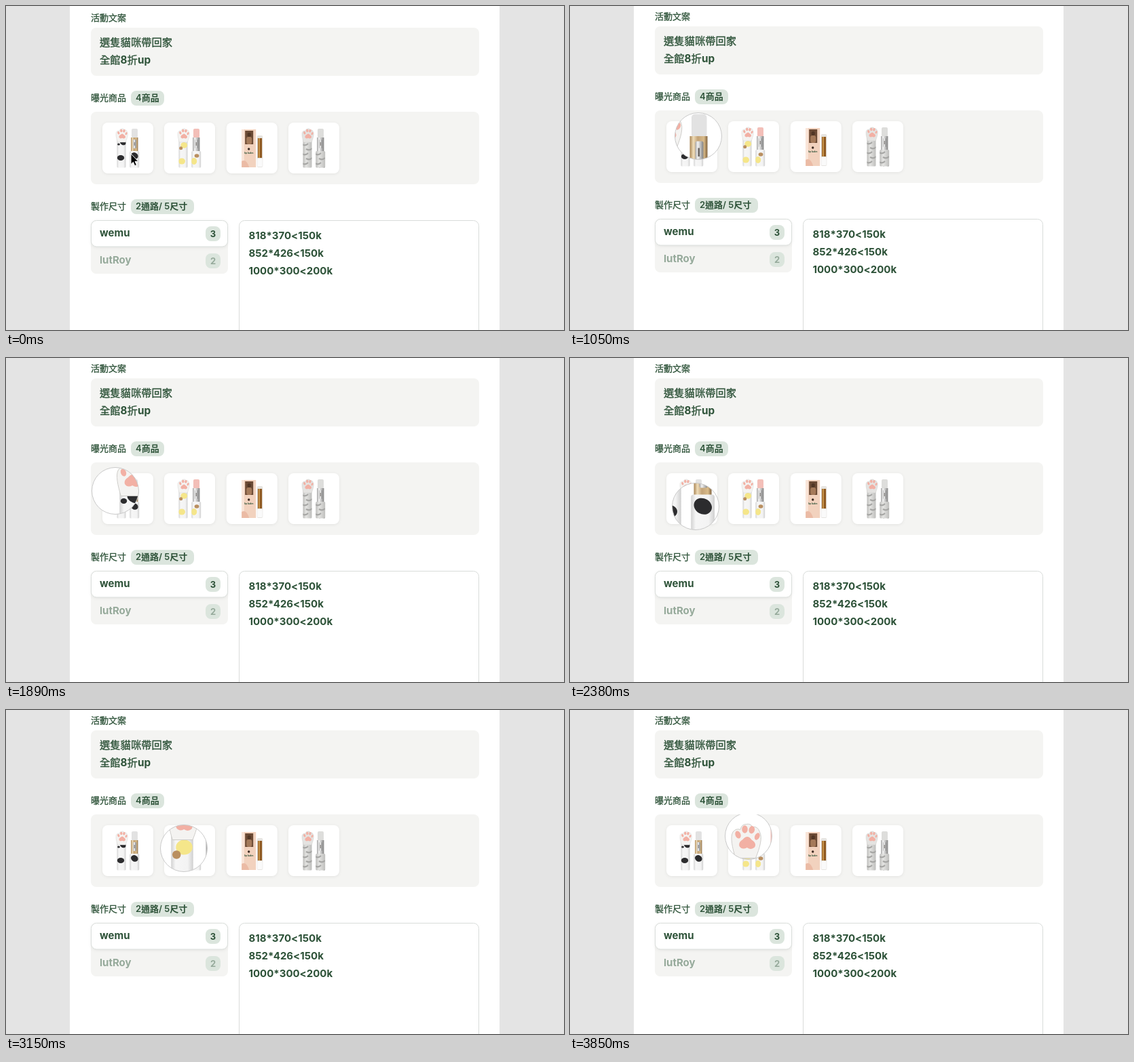
Animation, 822 px wide and 478 px high, one loop 4.13 s. Source, as an HTML page:

```html
<!DOCTYPE html>
<html lang="zh-Hant">
<meta charset="utf-8">
<style>
  html, body { margin: 0; width: 100%; height: 100%; overflow: hidden; background: #e4e4e4; }
  svg { display: block; width: 822px; height: 478px; }
  text { font: 700 15px Inter, "Noto Sans CJK TC", sans-serif; font-feature-settings: "calt" 0; fill: #2d5238; }
  .title { font-size: 13px; font-weight: 500; stroke: #2d5238; stroke-width: .3px; }
  .tag { font-size: 13px; font-weight: 600; }
  .copy { font-size: 15.3px; font-weight: 500; stroke: #2d5238; stroke-width: .35px; }
  .copy tspan { font-weight: 700; stroke: none; }
  .mid { text-anchor: middle; font-size: 13px; }
  .panel { fill: #f4f4f2; }
  .badge { fill: #dbe5dd; }
  .card { fill: #fff; filter: drop-shadow(0 1px 2px #0001); }
  .off { fill: #96aa9b; }
</style>
<svg viewBox="0 0 822 478">
  <defs>
    <linearGradient id="shell"><stop stop-color="#d2d2d2"/><stop offset=".2" stop-color="#f6f6f6"/><stop offset=".75" stop-color="#f3f3f3"/><stop offset="1" stop-color="#d0d0d0"/></linearGradient>
    <linearGradient id="grey"><stop stop-color="#bdbdbb"/><stop offset=".35" stop-color="#e4e4e2"/><stop offset="1" stop-color="#bebebc"/></linearGradient>
    <linearGradient id="gold"><stop stop-color="#a98555"/><stop offset=".2" stop-color="#efdcb8"/><stop offset=".45" stop-color="#c3a377"/><stop offset=".8" stop-color="#d9bb8a"/><stop offset="1" stop-color="#80623d"/></linearGradient>
    <linearGradient id="silver"><stop stop-color="#a2a2a2"/><stop offset=".3" stop-color="#f4f4f4"/><stop offset=".7" stop-color="#b5b5b5"/><stop offset="1" stop-color="#808080"/></linearGradient>
    <clipPath id="skin"><rect x="21.5" y="190" width="13" height="46.5" rx="1.5"/><rect x="40.3" y="212" width="13.9" height="24.5" rx="1.5"/></clipPath>
    <clipPath id="shelf"><rect x="125" y="154" width="572" height="107" rx="8"/></clipPath>
    <clipPath id="glass"><circle r="34.5"/></clipPath>
  </defs>
  <path fill="#fff" d="M94 0h633v478H94z"/>
  <g id="page">
    <text class="title" x="125" y="20">活動文案</text>
    <rect class="panel" x="125" y="30" width="572" height="71" rx="8"/>
    <text class="copy" x="138" y="57">選隻貓咪帶回家</text>
    <text class="copy" x="138" y="83">全館<tspan>8</tspan>折<tspan>up</tspan></text>

    <text class="title" x="125" y="138">曝光商品</text>
    <rect class="badge" x="184" y="123" width="49" height="22" rx="8"/>
    <text class="tag" x="191" y="138">4商品</text>
    <rect class="panel" x="125" y="154" width="572" height="107" rx="8"/>
    <g id="cards"></g>

    <text class="title" x="125" y="298">製作尺寸</text>
    <rect class="badge" x="184" y="283" width="93" height="22" rx="8"/>
    <text class="tag" x="191" y="298">2通路/ 5尺寸</text>
    <rect class="panel" x="125" y="314" width="202" height="79" rx="8"/>
    <rect class="card" x="125.5" y="314.5" width="201" height="38.5" rx="8" stroke="#dadedb"/>
    <text x="138" y="338">wemu</text>
    <rect class="badge" x="294" y="323" width="22" height="22" rx="8"/>
    <text class="mid" x="305" y="338.5">3</text>
    <text class="off" x="138" y="378">lutRoy</text>
    <rect class="badge" x="294" y="363" width="22" height="22" rx="8"/>
    <text class="mid off" x="305" y="378.5">2</text>
    <rect x="343.5" y="314.5" width="353" height="200" rx="8" fill="#fff" stroke="#d9dcda"/>
    <text x="357.5" y="342">818*370&lt;150k</text>
    <text x="357.5" y="368">852*426&lt;150k</text>
    <text x="357.5" y="394">1000*300&lt;200k</text>
  </g>
  <g clip-path="url(#shelf)">
    <g id="lens">
      <circle r="34.5" fill="#fff"/>
      <g clip-path="url(#glass)"><use id="zoom"/></g>
      <circle r="34.5" fill="none" stroke="#c9c9c9"/>
    </g>
  </g>
  <path id="cursor" d="M184 218v15.5l3.4-3.2 2.3 5.4 2.7-1.2-2.3-5.2h4.7z" stroke="#fff"/>
</svg>
<script>
const $ = id => document.getElementById(id);
const oval = (fill, x, y, rx, ry = rx, turn = 0) =>
  `<ellipse cx="${x}" cy="${y}" rx="${rx}" ry="${ry}" fill="${fill}" transform="rotate(${turn} ${x} ${y})"/>`;
const box = (fill, x, y, w, h, r = 0) =>
  `<rect x="${x}" y="${y}" width="${w}" height="${h}" rx="${r}" fill="${fill}"/>`;

const pink = '#f2b0a4';
const paw = fur => `<path fill="${fur}" stroke="#c9c7c4" stroke-width=".35"
    d="M22.3 199C20.5 193 19 186.5 20.8 183.6Q22.6 181.2 25.2 182.2Q25.8 179 28.6 179Q31.2 178.4 32.3 180.6Q35.4 180 36.6 183.6C38.4 187 36.6 193 34.2 199Z"/>` +
  oval(pink, 23.8, 185.2, 1.6, 2.3, -20) + oval(pink, 27.8, 182, 1.7, 2.3) +
  oval(pink, 31.9, 182.3, 1.7, 2.3, 12) + oval(pink, 35.1, 186.2, 1.4, 2.2, 25) +
  `<path fill="${pink}" d="M24.6 192Q23.9 189.6 26.6 188Q29.4 184.8 31.8 188.2Q35 190.2 33.6 192.6Q31.6 194.4 29.1 192.8Q26.2 194.4 24.6 192Z"/>`;

// A paw-topped tube beside an open stick, on a 75px card
const catStick = (shell, metal, tip, marks) =>
  box(`url(#${shell})`, 21.5, 190, 13, 46.5, 1.5) +
  box(tip, 43, 179, 9, 14, 2) + box(`url(#${metal})`, 42, 192, 10.4, 20.5) +
  box('url(#silver)', 45.2, 195, 4.8, 13, 1) + box('#6a6561', 46.8, 199, 1, 5) +
  box(`url(#${shell})`, 40.3, 212, 13.9, 24.5, 1.5) +
  `<g clip-path="url(#skin)">${marks}</g>` + paw(shell === 'grey' ? '#e4e3e1' : '#f4f3f1');

const black = '#2c2c2e', yellow = '#f5e68a', brown = '#b98f60';
const stripes = Array.from({ length: 5 }, (_, i) => [[20, 202], [39, 216]].map(([x, y]) =>
  `<path fill="none" stroke="#a6a6a4" stroke-width="2.2" d="M${x + i % 2 * 6} ${y + i * 7}q5 3 9-1"/>`).join('')).join('');

const products = [
  catStick('shell', 'gold', '#e2e2e2',
    oval(black, 30.5, 199.5, 4.6, 3.6, 20) + oval(black, 24, 202, 1.9, 1.6) + oval(black, 27, 222, 5.2, 4) +
    oval(black, 47.3, 218.9, 5.5, 4.6, 30)),
  catStick('shell', 'silver', '#f3bfb8',
    oval(yellow, 29.2, 203.4, 4.9, 4.4) + oval(brown, 24.7, 207.8, 2.5) + oval(yellow, 26, 227, 5, 4.5) +
    oval(yellow, 44, 227, 4.2, 5) + oval(brown, 48, 219, 3.4, 2.8)),
  box('#f2d2be', 22.5, 180, 21, 56) + box('#fae6da', 22.5, 180, 3.5, 56) +
    box('#6b4a35', 27.5, 182, 12, 20) + box('#a57a5a', 29.5, 191, 8, 11, 3) + box('#513625', 31, 185, 5, 6, 2) +
    oval('#3a2a22', 33, 209, 1.7) +
    '<text x="33" y="216" text-anchor="middle" style="font-size:3.5px">lip balm</text>' +
    '<path fill="#ebbba5" d="M22.5 227q7-4 11 9H22.5z"/>' +
    box('#e6e4e0', 45, 189, 8.6, 47, 2) + box('#fafafa', 45.6, 223, 7.4, 12, 1) +
    box('#8f5a22', 46.2, 193, 6.2, 29) + box('#c9964c', 47.2, 193, 2, 29),
  catStick('grey', 'silver', '#dddddb', stripes)
];
const cardX = [142, 233, 324.7, 416];
$('cards').innerHTML = products.map((art, i) =>
  `<rect class="card" x="${cardX[i]}" y="170" width="75" height="75" rx="8"/>` +
  `<g id="item${i}" transform="translate(${cardX[i]})">${art}</g>`).join('');

// Lens centre: time, x, y
const path = [
  [210, 184, 217], [420, 186, 209], [700, 188, 203], [1050, 189, 192], [1260, 181, 190],
  [1540, 166, 191], [1820, 161, 194], [1890, 161, 196], [2100, 166, 207], [2380, 185, 219],
  [2590, 191, 221], [2940, 203, 208], [3010, 214, 206], [3080, 250, 205], [3150, 262, 204],
  [3500, 264, 198], [3850, 263, 186], [4130, 263, 186]
];
function lensAt(t) {
  const i = Math.max(1, path.findIndex(p => p[0] > t));
  const [a, b] = [path[i - 1], path[i]];
  const k = (t - a[0]) / (b[0] - a[0]);
  return [1, 2].map(n => a[n] + (b[n] - a[n]) * k);
}

const loop = 4130, step = 70, start = 210, zoom = 2.5;
function draw(now) {
  const t = Math.floor(now % loop / step) * step;
  const hovering = t >= start;
  $('page').setAttribute('transform', `translate(0 ${hovering ? 0 : 2})`);
  $('lens').style.display = hovering ? '' : 'none';
  $('cursor').style.display = hovering ? 'none' : '';
  if (hovering) {
    const [x, y] = lensAt(t);
    $('lens').setAttribute('transform', `translate(${x} ${y})`);
    $('zoom').setAttribute('href', x < 225 ? '#item0' : '#item1');
    $('zoom').setAttribute('transform', `scale(${zoom}) translate(${-x} ${-y})`);
  }
}
const origin = performance.now();
function tick() {
  draw(performance.now() - origin);
  requestAnimationFrame(tick);
}
tick();
</script>
</html>
```
